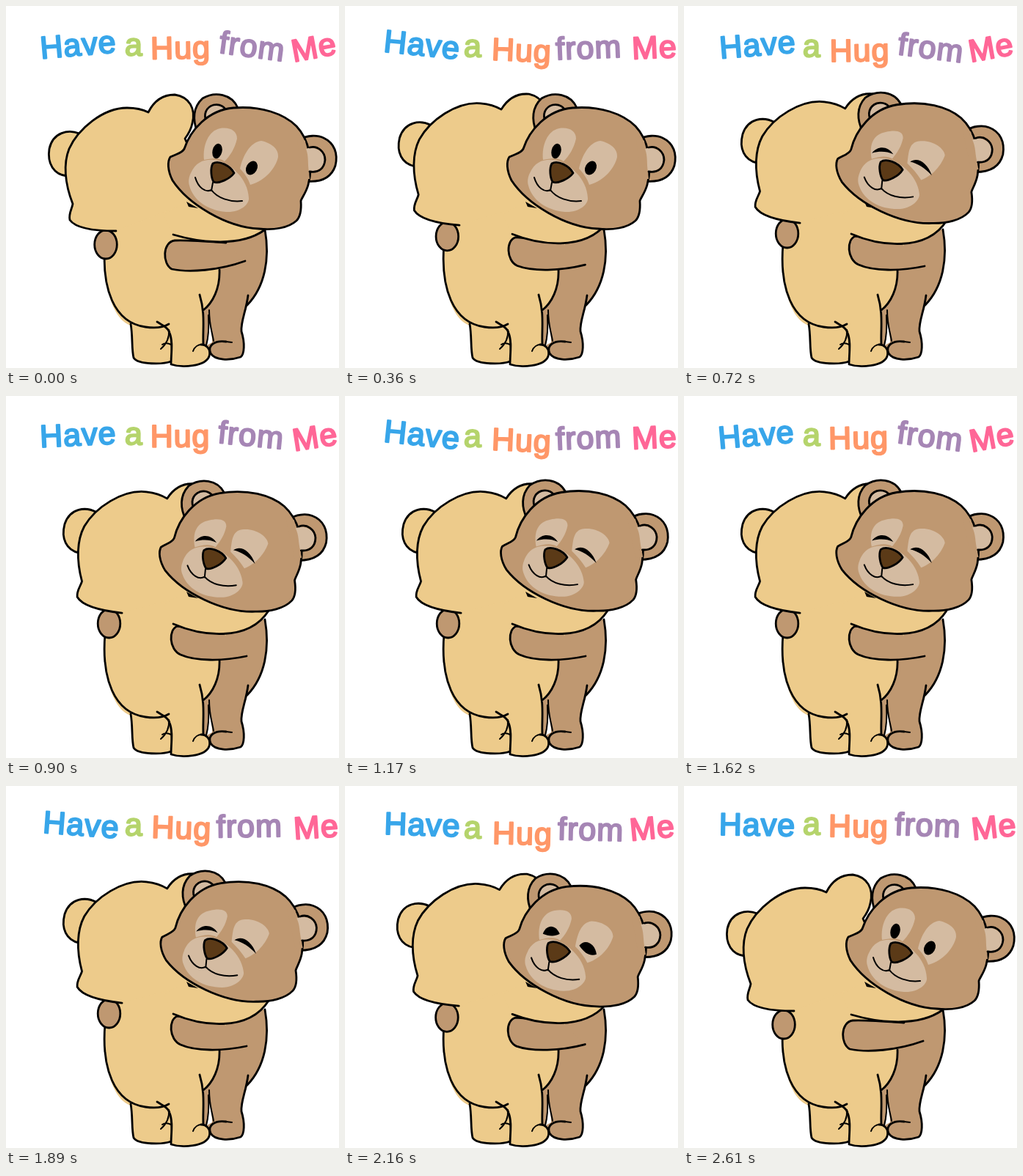
Animation, 454 px wide and 494 px high, one loop 2700 ms. Source, as an HTML page:

```html
<!DOCTYPE html>
<html lang="en">
<head>
<meta charset="utf-8">
<title>Have a Hug from Me</title>
<style>
  html, body { margin: 0; width: 100%; height: 100%; overflow: hidden; background: #fff; }
  svg { display: block; width: 100%; height: 100%; }
  .ink { stroke: #000; stroke-width: 2.8; stroke-linecap: round; stroke-linejoin: round; }
  .thin { stroke-width: 2; }
  .line { fill: none; }
  .honey { fill: #edcb8b; }
  .brown { fill: #bf9871; }
  .pale { fill: #d4bba1; }
  text {
    font: 43px "Liberation Sans", Arial, sans-serif; text-anchor: middle; letter-spacing: 1px;
    stroke-width: 2.2; stroke-linejoin: round;
  }
</style>
</head>
<body>
<svg viewBox="0 0 454 494">
  <g id="words"></g>

  <!-- brown body and legs -->
  <path class="brown" d="M270 300L353 305C360 345 353 385 330 406C326 420 320 430 321 444C326 460 325 475 320 479C305 484 285 484 279 474L270 464Z"/>
  <path fill="#fff" d="M277 420C277 435 281 445 281 459L274 463C276 452 277 440 277 420Z"/>
  <path class="line ink" d="M353 305C360 345 353 383 329 408M330 395C327 418 320 430 321 444C326 460 325 475 320 479C305 484 285 484 279 474C274 462 286 456 300 458"/>
  <path class="line ink thin" d="M300 458L308 459M277 415C277 435 281 445 283 457M276 422C277 440 276 452 273 463"/>

  <!-- honey body and legs -->
  <path class="honey" d="M152 285L136 325C131 385 147 430 171 436C173 450 171 468 174 480C180 490 215 489 225 485L225 489C240 494 272 492 277 478C280 468 272 463 269 462C268 440 271 430 269 414C282 405 292 385 291 360L300 325L250 265Z"/>
  <path class="line ink" d="M135 325C130 385 147 432 190 438C204 440 214 439 222 434M206 431C214 436 222 440 223 446C228 458 225 475 225 489C240 494 272 492 277 478C280 467 272 462 266 462M264 394C272 420 268 440 269 462M291 360C292 385 282 405 269 415M170 434C173 450 171 468 174 480C180 490 215 489 225 485"/>
  <path class="line ink thin" d="M222 442C223 452 219 461 211 468M213 462C216 460 221 460 225 462M255 471C257 465 262 462 267 462"/>

  <path id="arm" class="brown ink"/>
  <ellipse id="hand" class="brown ink" cx="136" cy="325.5" rx="15.3" ry="19.5"/>

  <g id="honeyHead">
    <path class="honey ink" d="M100 174C85 168 64 172 59 195C56 215 65 230 83 232"/>
    <path class="honey ink" d="M150 307C120 307 95 303 87 292C85 283 90 277 91 270C80 242 78 215 86 195C98 168 132 139 165 139C177 139 186 141 194 145C203 127 217 121 230 121C250 124 259 140 254 160C252 170 247 177 244 181L248 190C262 215 262 240 249 268"/>
  </g>

  <path id="sleeveFill" class="honey"/>
  <path id="sleeve" class="line ink"/>
  <path d="M246 267L262 276L249 274Z"/>

  <g id="brownHead">
    <path class="brown ink" d="M261 172C254 155 255 138 268 126C285 116 308 120 316 139"/>
    <path class="pale ink" d="M274 159C268 148 273 138 283 135C292 133 299 138 301 145"/>
    <path class="brown ink" d="M402 182C410 176 425 176 433 180C448 187 453 202 449 218C443 236 428 241 408 239"/>
    <path class="brown ink" d="M224 206C232 202 240 201 243 195C251 170 275 142 310 139C348 136 379 147 396 164C413 182 420 213 412 244C409 255 403 262 402 266C403 280 401 288 396 293C385 303 365 306 345 304C300 302 248 270 227 238C220 224 220 212 224 206Z"/>
    <path class="brown" d="M396 175L408 184L414 236L404 236Z"/>
    <path class="pale" d="M409 195C420 191 434 198 434 210C433 220 425 226 413 226C411 215 413 205 409 195Z"/>
    <path class="line ink" d="M414 193C425 190 435 199 435 210C434 222 426 228 414 226"/>

    <path id="leftPatch" class="pale"/>
    <path id="rightPatch" class="pale"/>
    <path class="pale" d="M252 228C260 210 275 208 290 211C305 215 330 235 331 262C332 270 320 282 300 281C275 279 255 265 250 245C248 238 250 232 252 228Z"/>

    <g class="eyes">
      <ellipse cx="288" cy="198" rx="6.5" ry="10.3" transform="rotate(14 288 198)"/>
      <ellipse cx="335" cy="221" rx="7.3" ry="10" transform="rotate(30 335 221)"/>
    </g>
    <g class="eyes">
      <path d="M275 202C280 189 293 189 298 203C290 207 282 205 275 202Z"/>
      <path d="M324 220C332 210 346 218 347 233C338 236 330 230 324 220Z"/>
    </g>
    <g class="eyes">
      <path d="M271 202C279 193 293 193 300 206C291 201 282 200 271 202Z"/>
      <path d="M322 218C332 212 345 220 350 239C341 228 332 221 322 218Z"/>
    </g>

    <path class="ink" fill="#5b3a17" d="M282 215C278 222 280 235 283 240C290 243 305 236 311 228C306 218 290 210 282 215Z"/>
    <path class="line ink thin" d="M282 241L280 252M258 234C262 248 272 255 280 251C288 262 305 268 322 266"/>
  </g>
</svg>

<script>
const LOOP = 2700, STEP = 90, SWING = 810;
const $ = id => document.getElementById(id);

// Smooth 0 to 1 between two times
function ramp(t, from, to) {
  const k = Math.min(1, Math.max(0, (t - from) / (to - from)));
  return k * k * (3 - 2 * k);
}

// Blends two paths that share the same structure
function blend([from, to], k) {
  const end = to.match(/\d+/g);
  let n = 0;
  return from.replace(/\d+/g, v => (+v + (end[n++] - v) * k).toFixed(2));
}

function place(el, x, y, angle = 0, cx = 0, cy = 0) {
  el.setAttribute('transform', `translate(${x} ${y}) rotate(${angle} ${cx} ${cy})`);
}

const words = [
  { label: 'Have', color: '#38a6ea', x: 102, y: 67.5, angle: 0.4, driftX: 2.7, driftY: 0, tilt: 5.5 },
  { label: 'a', color: '#b5d46c', x: 174, y: 68.7, angle: 1, driftX: 0, driftY: 2.6, tilt: 0 },
  { label: 'Hug', color: '#ff9768', x: 239.5, y: 74.4, angle: 0.7, driftX: 2, driftY: 5.2, tilt: 1.7 },
  { label: 'from', color: '#a686b5', x: 333, y: 71, angle: 2.7, driftX: 1.5, driftY: 3, tilt: -5 },
  { label: 'Me', color: '#ff6797', x: 423.5, y: 71, angle: -6.6, driftX: -2, driftY: 0.8, tilt: 4 }
];
for (const w of words) {
  w.el = document.createElementNS('http://www.w3.org/2000/svg', 'text');
  w.el.textContent = w.label;
  w.el.setAttribute('fill', w.color);
  w.el.setAttribute('stroke', w.color);
  $('words').append(w.el);
}

// Loose and tight hug
const arm = [
  'M300 323C272 321 245 319 230 320C213 322 213 352 226 359C250 364 290 361 326 348',
  'M290 318C275 318 245 316 234 314C221 318 222 346 238 353C258 362 295 362 328 355'
];
const sleeve = [
  'M228 312C255 320 315 332 352 306',
  'M228 311C265 327 330 337 358 293'
];
// Face patches with open and closed eyes
const leftPatch = [
  'M270 210C268 190 276 170 292 167C305 165 315 170 315 181C312 195 305 205 298 212C290 206 280 208 270 210Z',
  'M270 210C268 188 276 177 292 175C305 173 316 175 315 185C312 196 305 205 298 212C290 206 280 208 270 210Z'
];
const rightPatch = [
  'M319 222C323 205 332 186 348 184C362 187 372 195 371 206C368 220 355 238 333 244C330 235 325 228 319 222Z',
  'M318 220C321 206 322 192 336 191C354 190 370 203 370 213C366 222 355 238 335 244C330 235 325 228 318 220Z'
];
const eyes = document.querySelectorAll('.eyes');

function drawWords(t) {
  const turn = t / SWING * 2 * Math.PI;
  const drift = Math.cos(turn - 4.19), tilt = Math.cos(turn - 2.88);
  for (const w of words) {
    place(w.el, w.x + w.driftX * drift, w.y + w.driftY * drift, w.angle + w.tilt * tilt, 0, 12);
  }
}

function drawBears(t) {
  const hug = ramp(t, 0, 540) - ramp(t, 1890, 2565);
  place($('honeyHead'), 17 * hug, -8.2 * hug, 6.3 * hug, 170, 225);
  place($('hand'), 4.5 * hug, -15 * hug);
  $('arm').setAttribute('d', blend(arm, hug));
  const edge = blend(sleeve, hug);
  $('sleeve').setAttribute('d', edge);
  $('sleeveFill').setAttribute('d', edge + 'L335 270L250 264L215 285Z');

  // The brown head leans in, lifts a little later and nuzzles meanwhile
  const lean = ramp(t, 360, 720) - ramp(t, 1890, 2430);
  const lift = ramp(t, 360, 1080) - ramp(t, 1750, 2300);
  const nuzzle = 2.4 * Math.cos((t - 720) / 900 * 2 * Math.PI);
  place($('brownHead'), -(10.5 + nuzzle) * lean, -6.5 * lift, -4.6 * lean, 294, 227);
  $('leftPatch').setAttribute('d', blend(leftPatch, lean));
  $('rightPatch').setAttribute('d', blend(rightPatch, lean));

  const shut = lean < 0.3 ? 0 : lean < 0.85 ? 1 : 2;
  eyes.forEach((el, i) => el.style.display = i === shut ? '' : 'none');
}

function tick() {
  const now = performance.now() % LOOP;
  const t = Math.floor(now / STEP) * STEP;
  drawWords(t);
  drawBears(t);
  requestAnimationFrame(tick);
}
tick();
</script>
</body>
</html>
```
